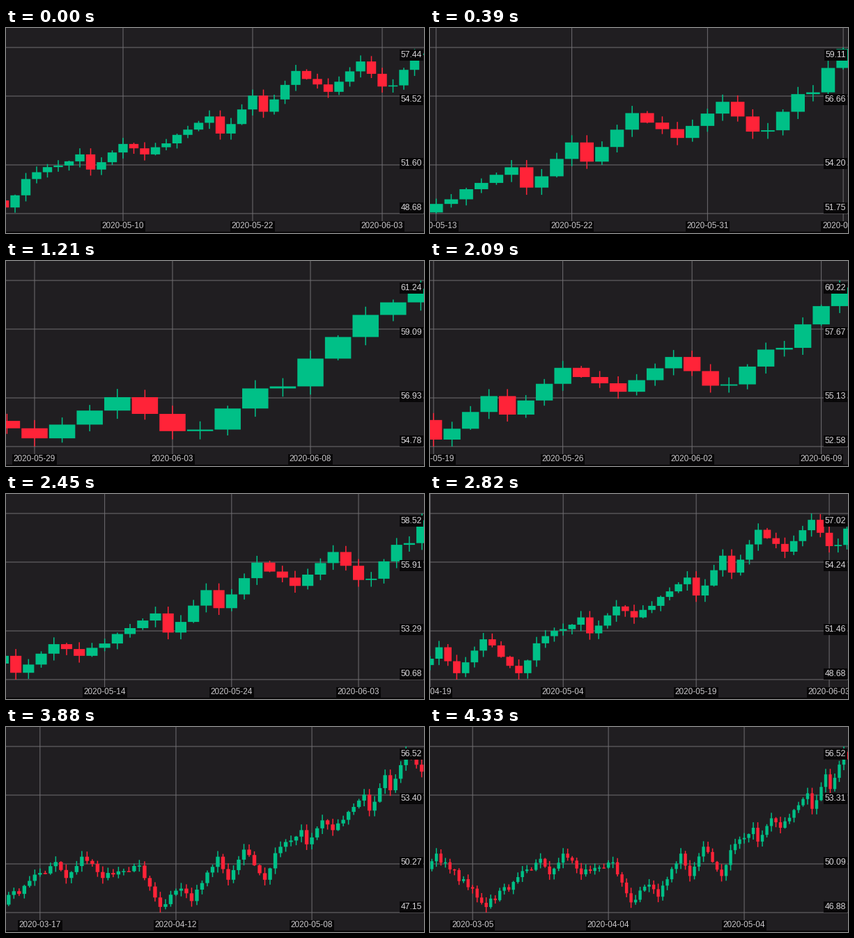
Recreate the animation shown at these times as a matplotlib script. Size 600 px wide and 295 px high, loop 4360 ms.

```python
import numpy as np
import matplotlib.pyplot as plt
from matplotlib.animation import FuncAnimation
from matplotlib.collections import LineCollection, PolyCollection
from matplotlib.patches import Rectangle

W, H, DPI = 600, 295, 100
LOOP, STEP = 4360, 10
PX = 72 / DPI
BG, GRID, BOX = "#201e21", "#706e72", "#080708"
PRICE, DATE = "#d8d6d9", "#cac8cb"
UP, DOWN = "#00c087", "#ff2338"
TOP, BOTTOM = 28, 267
BASE_DAY = np.datetime64("2020-06-03")
FIRST, LAST = -99, 10   # candles, in days from BASE_DAY
TICK_ORIGIN = 3900      # ticks fall on multiples counted from here

# Turning points of the closing price: day, price
SWINGS = np.array([
    (-100, 49.4), (-98, 50.3), (-87, 47.2), (-75, 50), (-73, 49.1),
    (-70, 50.3), (-66, 49.1), (-59, 49.8), (-55, 47.47), (-51, 48.5),
    (-49, 47.8), (-44, 50.3), (-42, 49), (-39, 50.7), (-35, 49),
    (-33, 50.5), (-28, 51.8), (-27, 51), (-24, 52.35), (-22, 51.8),
    (-16, 53.8), (-15, 52.9), (-14, 53.4), (-12, 54.9), (-11, 54.05),
    (-8, 56.2), (-5, 55.1), (-2, 56.7), (0, 55.38), (1, 55.44),
    (3, 57.04), (4, 57.12), (5, 58.2), (7, 59.9), (9, 60.92)])


def make_candles():
    """Seeded candles that run between the swings, calmer towards the end."""
    rng = np.random.default_rng(4)
    days = np.arange(FIRST - 1, LAST + 1)
    turn = np.isin(days, SWINGS[:, 0])
    noise = rng.uniform(-1, 1, days.size) * np.linspace(0.3, 0.03, days.size)
    price = np.interp(days, *SWINGS.T) + np.where(turn, 0, noise)
    top = np.maximum(price[:-1], price[1:])
    low = np.minimum(price[:-1], price[1:])
    wicks = rng.uniform(0.03, 0.3, (2, top.size))
    wicks[:, turn[1:]] = 0.32
    return top, low, top + wicks[0], low - wicks[1], price[1:] >= price[:-1]


body_hi, body_lo, highs, lows, rising = make_candles()

# Zoom: candle spacing over time, smooth in log scale
KEY_T = np.array([0, 760, 1210, 1480, 2090, 2820, 3450, 4360])
KEY_LOG = np.log([15.5, 29.17, 39.6, 44.5, 26.5, 12.73, 8.875, 6.43])
KEY_SLOPE = np.gradient(KEY_LOG, KEY_T)


def spacing(t):
    i = min(np.searchsorted(KEY_T, t, side="right") - 1, len(KEY_T) - 2)
    h = KEY_T[i + 1] - KEY_T[i]
    u = (t - KEY_T[i]) / h
    a, b = KEY_LOG[i:i + 2]
    ma, mb = KEY_SLOPE[i:i + 2] * h
    ease = u * u * (3 - 2 * u)
    return np.exp(a + (b - a) * ease + ma * u * (1 - u) ** 2 - mb * u * u * (1 - u))


def base_x(s):
    """Screen x of BASE_DAY; the zoom is anchored right of the stage."""
    return min(722 - 11.7 * s, 733.6 - 12.49 * s)


fig = plt.figure(figsize=(W / DPI, H / DPI), dpi=DPI, facecolor=BG)
ax = fig.add_axes([0, 0, 1, 1])
ax.set(xlim=(0, W), ylim=(H, 0))
ax.axis("off")

for y in (28, 98, 197, 267):
    ax.plot([0, W], [y, y], color=GRID, lw=PX, zorder=1, snap=False)
ax.add_patch(Rectangle((0, 293), W, 2, fc=BOX, ec="none", zorder=6))

ticks = LineCollection([], colors=GRID, linewidths=PX, zorder=1)
wicks = LineCollection([], linewidths=1.5 * PX, zorder=2)
bodies = PolyCollection([], edgecolors="none", zorder=3)
for c in (ticks, wicks, bodies):
    c.set_snap(False)
    ax.add_collection(c, autolim=False)


def label(x, y, ha, size, color):
    return ax.text(x, y, "", ha=ha, va="center", family="Liberation Sans",
                   fontsize=size * PX, color=color, zorder=5, clip_on=True,
                   bbox=dict(fc=BOX, ec="none", pad=1.6 * PX))


prices = [label(597, y, "right", 12.3, PRICE) for y in (39, 103, 195, 259)]
dates = [label(0, 285.5, "center", 11.8, DATE) for _ in range(6)]


def update(i):
    s = spacing(i * STEP)
    x0 = base_x(s)
    first = max(round(-x0 / s), FIRST)
    last = min(int(np.floor((W - x0) / s + 0.55)), LAST)
    days = np.arange(first, last + 1)
    view = slice(first - FIRST, last - FIRST + 1)
    hi, lo = highs[view].max(), lows[view].min()

    def to_y(p):
        return TOP + (hi - p) / (hi - lo) * (BOTTOM - TOP)

    x = x0 + days * s
    half = (s - 2.1) / 2
    y1, y2 = to_y(body_hi[view]), to_y(body_lo[view])
    y2 = np.maximum(y2, y1 + 1.5)
    left, right = x - half, x + half
    corners = [(left, y1), (right, y1), (right, y2), (left, y2)]
    bodies.set_verts(np.array(corners).transpose(2, 0, 1))
    ends = [(x, to_y(highs[view])), (x, to_y(lows[view]))]
    wicks.set_segments(np.array(ends).transpose(2, 0, 1))
    colors = np.where(rising[view], UP, DOWN)
    bodies.set_facecolor(colors)
    wicks.set_color(colors)

    for text, p in zip(prices, np.linspace(hi, lo, 4)):
        text.set_text(f"{p:.2f}")

    step = int(W / s / 3)
    marks = [int(d) for d in days if (d + TICK_ORIGIN) % step == 0]
    ticks.set_segments([[(x0 + d * s, 0), (x0 + d * s, 293)] for d in marks])
    for k, text in enumerate(dates):
        text.set_visible(k < len(marks))
        if k < len(marks):
            text.set_x(x0 + marks[k] * s)
            text.set_text(str(BASE_DAY + marks[k]))
    return [bodies, wicks, ticks, *prices, *dates]


anim = FuncAnimation(fig, update, frames=LOOP // STEP, interval=STEP,
                     init_func=lambda: update(0), repeat=True, repeat_delay=0)
plt.show()
```
